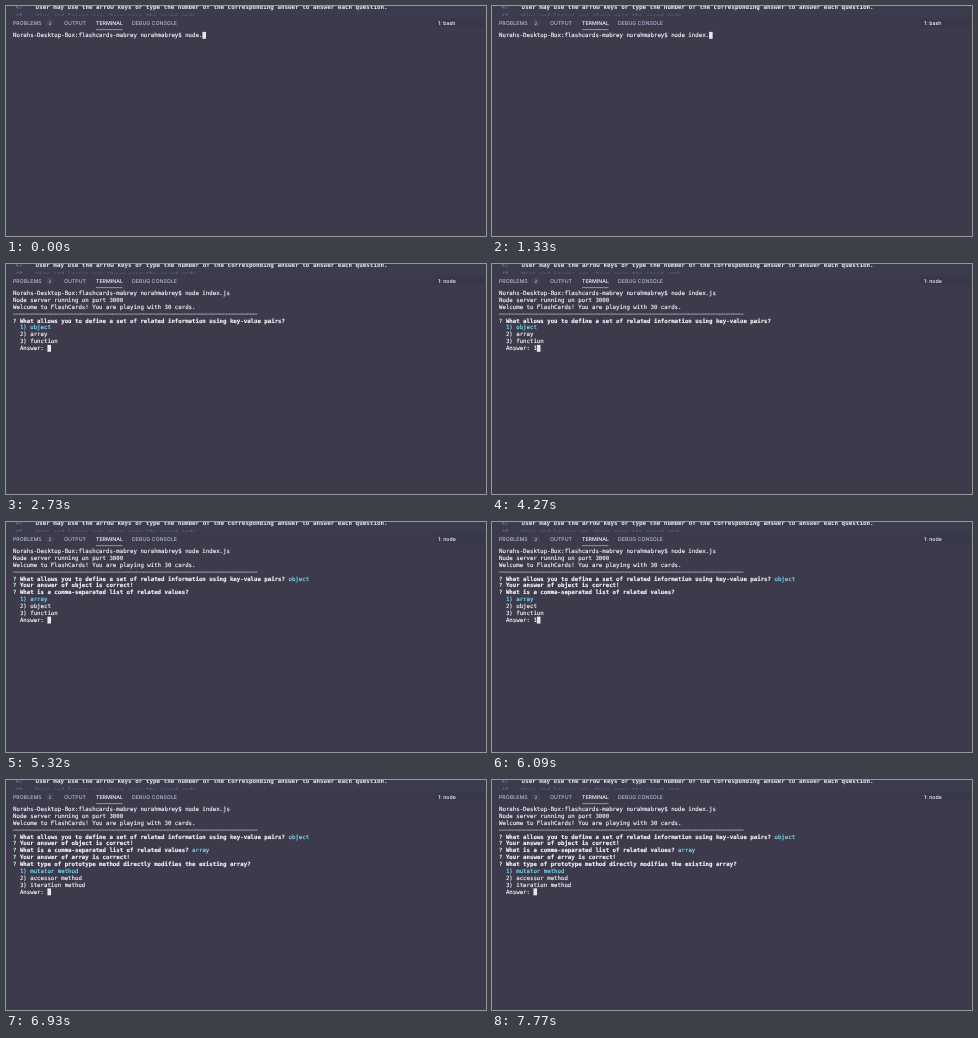
Recreate the animation shown at these times as an HTML page. Size 480 px wide and 230 px high, loop 8 s.

```html
<!DOCTYPE html>
<html lang="en">
<head>
<meta charset="utf-8">
<title>Flashcards in the terminal</title>
<style>
  html, body { margin: 0; width: 100%; height: 100%; overflow: hidden; background: #3c3a4b; }
  svg { display: block; width: 480px; height: 230px; }
  text { white-space: pre; text-rendering: geometricPrecision; fill: #f8f8fc; }
  .mono { font: 5.72px "DejaVu Sans Mono", monospace; stroke: #f8f8fc; stroke-width: .14px; }
  .code { font: bold 5.92px "DejaVu Sans Mono", monospace; fill: #e8e8f2; }
  .tab { font: 500 5.25px Inter, sans-serif; fill: #b4bbdc; }
  .on { fill: #fafaff; }
  .dim { fill: #7c7e94; font-weight: normal; }
  .b { font-weight: bold; }
  .g { fill: #c6f0b4; stroke: #c6f0b4; font-weight: bold; }
  .c { fill: #80e2fc; stroke: #80e2fc; }
</style>
</head>
<body>
<svg viewBox="0 0 480 230">
  <defs><clipPath id="top"><rect width="480" height="9.5"/></clipPath></defs>
  <rect width="480" height="230" fill="#3c3a4b"/>
  <g clip-path="url(#top)">
    <rect width="480" height="10" fill="#3b3d4f"/>
    <text class="code dim" x="9.5" y="3.3">47</text>
    <text class="code" x="29.6" y="3.3">User may use the arrow keys or type the number of the corresponding answer to answer each question.</text>
    <text class="code dim" x="9.5" y="12.3">48</text>
    <text class="code dim" x="29.6" y="12.3">Wins and losses are shown once the round ends.</text>
  </g>
  <text class="tab" x="7" y="19">PROBLEMS</text>
  <circle cx="44" cy="17.1" r="4" fill="#41425a"/>
  <text class="tab" x="44" y="18.8" text-anchor="middle" style="font-size:4.6px">2</text>
  <text class="tab" x="58" y="19">OUTPUT</text>
  <text class="tab on" x="90" y="19">TERMINAL</text>
  <rect x="90" y="23.3" width="26.5" height=".8" fill="#a9a9c0"/>
  <text class="tab" x="126" y="19">DEBUG CONSOLE</text>
  <rect x="429" y="12.6" width="49" height="8.4" fill="#373747"/>
  <text class="tab on" id="shell" x="432" y="19"></text>
  <g id="rows"></g>
  <rect id="cursor" width="3.6" height="6.9" fill="#e6e6ee"/>
</svg>
<script>
const LOOP = 8000, X = 7, COL = 3.4436, ROW = 6.875;
const el = id => document.getElementById(id);

// A row is a list of [text, class] runs.
const plain = s => [[s, '']];
const ask = (s, answer = '') => [['? ', 'g'], [s + ' ', 'b'], [answer, 'c']];
const prompt = s => plain('Norahs-Desktop-Box:flashcards-mabrey norahmabrey$ ' + s);
const quiz = (question, options, typed = '') => [
  ask(question),
  ...options.map((o, i) => [[`  ${i + 1}) ${o}`, i ? '' : 'c']]),
  plain('  Answer: ' + typed)
];

const q1 = 'What allows you to define a set of related information using key-value pairs?';
const q2 = 'What is a comma-separated list of related values?';
const q3 = 'What type of prototype method directly modifies the existing array?';
const o1 = ['object', 'array', 'function'];
const o2 = ['array', 'object', 'function'];
const o3 = ['mutator method', 'accessor method', 'iteration method'];

const intro = [
  prompt('node index.js'),
  plain('Node server running on port 3000'),
  plain('Welcome to FlashCards! You are playing with 30 cards.'),
  [['─'.repeat(71), 'b']]
];
const done1 = [...intro, ask(q1, 'object'), ask('Your answer of object is correct!')];
const done2 = [...done1, ask(q2, 'array'), ask('Your answer of array is correct!')];

const typing = [
  [0, 'node.'], [490, 'node'], [700, 'node '],
  [840, 'node i'], [910, 'node in'], [980, 'node ind'], [1050, 'node inde'],
  [1260, 'node index'], [1330, 'node index.'],
  [1820, 'node index.j'], [1890, 'node index.js']
];
const steps = [
  ...typing.map(([at, s]) => [at, [prompt(s)]]),
  [2100, [intro[0], plain('')]],
  [2590, [...intro, ...quiz(q1, o1)]],
  [4270, [...intro, ...quiz(q1, o1, '1')]],
  [4340, done1],
  [5320, [...done1, ...quiz(q2, o2)]],
  [5880, [...done1, ...quiz(q2, o2, '1')]],
  [6160, done2],
  [6650, [...done2, ...quiz(q3, o3)]]
];

const markup = (runs, i) =>
  `<text class="mono" xml:space="preserve" x="${X}" y="${31 + i * ROW}">` +
  runs.map(([s, c]) => `<tspan class="${c}">${s}</tspan>`).join('') + '</text>';

let shown = null;
function draw(now) {
  const t = now % LOOP;
  el('shell').textContent = t < 2450 ? '1: bash' : '1: node';
  const step = steps.filter(s => s[0] <= t).pop();
  if (step !== shown) {
    shown = step;
    const rows = step[1], last = rows.length - 1;
    const cols = rows[last].reduce((n, [s]) => n + s.length, 0);
    el('rows').innerHTML = rows.map(markup).join('');
    el('cursor').setAttribute('x', X + cols * COL);
    el('cursor').setAttribute('y', 25.9 + last * ROW);
  }
}

const start = performance.now();
function tick() {
  draw(performance.now() - start);
  requestAnimationFrame(tick);
}
tick();
</script>
</body>
</html>
```
